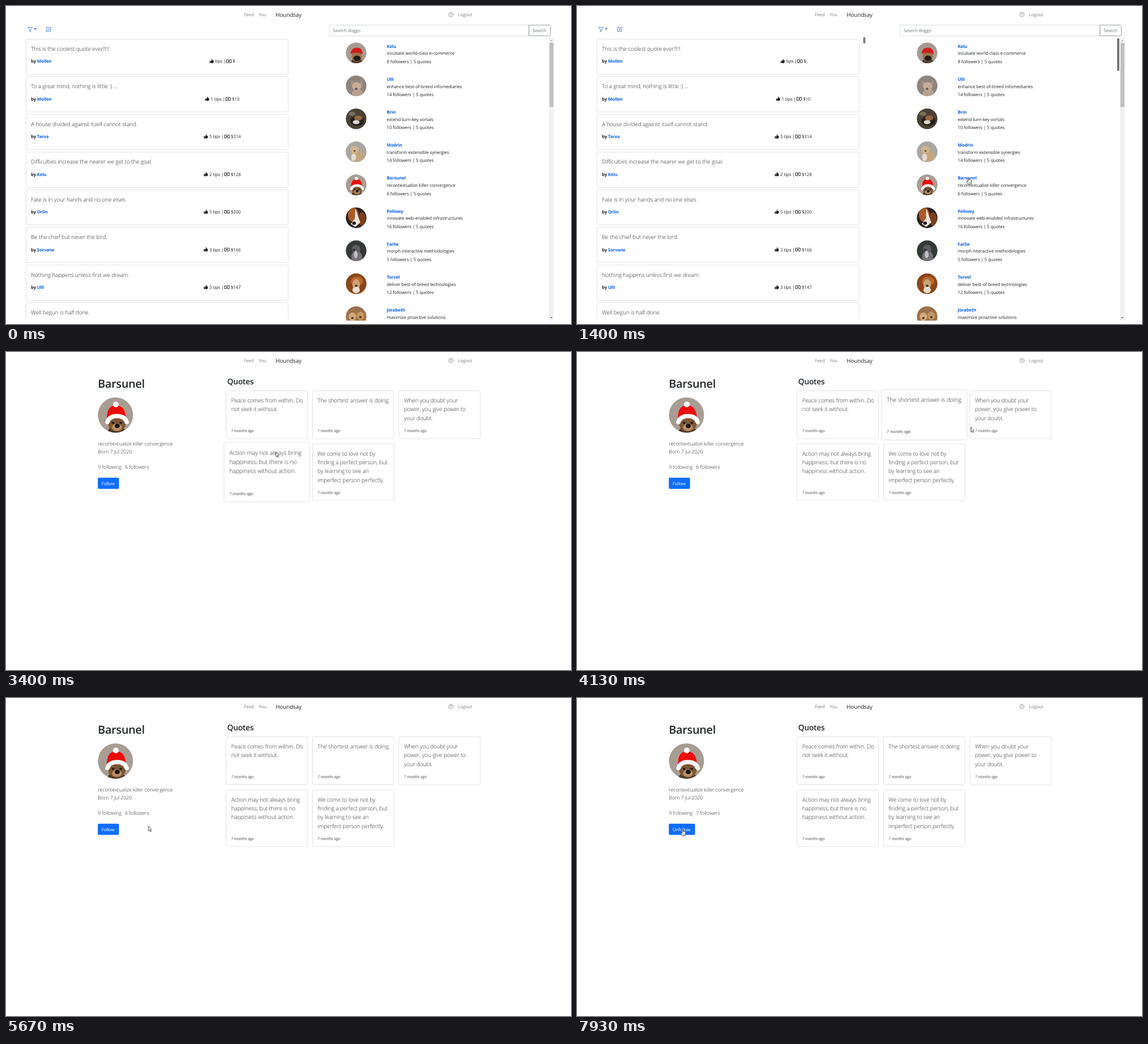
Write an HTML page that moves like this. It is 998 by 561 pixels and loops after 8 s.

```html
<!DOCTYPE html>
<html lang="en">
<head>
<meta charset="utf-8">
<title>Houndsay</title>
<style>
html, body { margin: 0; width: 100%; height: 100%; overflow: hidden; background: #fff; }
svg { display: block; width: 998px; height: 561px; }
text { font: 7.9px "Open Sans", "Noto Sans", sans-serif; letter-spacing: -.1px; fill: #212529; text-rendering: geometricPrecision; }
.nav, .gray { fill: #7d7d7d; }
.gray { fill: #6c757d; }
.brand { font-size: 9.9px; letter-spacing: -.12px; }
.bold { font-size: 7.8px; font-weight: 700; letter-spacing: -.15px; }
.link { fill: #0a60e6; }
.quote { font-size: 9.9px; font-weight: 300; letter-spacing: -.07px; }
.lead { font-size: 8.85px; font-weight: 300; letter-spacing: -.06px; }
.ago { font-size: 6.8px; font-style: italic; letter-spacing: -.08px; fill: #444; }
.h1 { font-size: 19.8px; font-weight: 600; letter-spacing: -.25px; }
.h2 { font-size: 13.8px; font-weight: 600; letter-spacing: -.25px; }
.white { fill: #fff; }
.url { font-size: 6.1px; letter-spacing: -.04px; fill: #444; }
.card { fill: #fff; stroke: #e0e0e0; stroke-width: .9; }
.zoom { transform-box: fill-box; transform-origin: center; }
</style>
</head>
<body>
<svg id="stage" viewBox="0 0 998 561"></svg>
<script>
const LOOP = 8000;
let css = '', count = 0;

// Registers a looping keyframe animation and returns its style attribute.
function animate(prop, stops, ease) {
  const id = 'k' + count++;
  const body = stops.map(([ms, v]) => `${ms * 100 / LOOP}%{${prop}:${v}}`).join('');
  css += `@keyframes ${id}{${body}}`;
  return `style="animation:${id} ${LOOP}ms ${ease} infinite"`;
}
const show = (...spans) => animate('opacity',
  [[0, 0], ...spans.flatMap(([a, b]) => [[a, 1], [b, 0]])], 'step-end');
const hover = (...spans) => animate('transform', [[0, 'scale(1)'],
  ...spans.flatMap(([a, b]) => [[a, 'scale(1)'], [a + 110, 'scale(1.05)'], [b, 'scale(1.05)'], [b + 110, 'scale(1)']]),
  [LOOP, 'scale(1)']], 'linear');

const text = (x, y, s, cls = '') => `<text x="${x}" y="${y}" class="${cls}">${s}</text>`;
const rect = (x, y, w, h, attrs) => `<rect x="${x}" y="${y}" width="${w}" height="${h}" ${attrs}/>`;
const oval = (x, y, rx, ry, fill) => `<ellipse cx="${x}" cy="${y}" rx="${rx}" ry="${ry}" fill="${fill}"/>`;
const path = (d, attrs) => `<path d="${d}" ${attrs}/>`;
const at = (x, y, s, scale = 1) => `<g transform="translate(${x} ${y}) scale(${scale})">${s}</g>`;
const line = (color, w) => `fill="none" stroke="${color}" stroke-width="${w}" stroke-linejoin="round" stroke-linecap="round"`;

// Portraits are drawn in a circle of radius 50.
const avatar = (x, y, r, art) => at(x, y, `<g clip-path="url(#round)">${art}</g>`, r / 50);
const santa = oval(0, 0, 50, 50, '#a89d93') + oval(3, 48, 25, 18, '#4d3927') + oval(4, 24, 25, 22, '#7d5835') +
  oval(4, 35, 14, 10, '#b98f62') + oval(5, 31, 7, 6, '#17120f') + oval(-7, 22, 4, 3, '#20160f') + oval(15, 22, 4, 3, '#20160f') +
  path('M-24 10C-25-16-15-27 2-27C20-27 28-14 30 10Z', 'fill="#f00a0a"') +
  path('M-23 20Q-17 3 4 3Q26 3 32 20', line('#fff', 12)) + oval(1, -30, 8, 8, '#fff');
const portraits = [
  oval(0, 0, 50, 50, '#a59b92') + oval(3, 44, 27, 20, '#54402f') + oval(3, 16, 25, 25, '#9a754f') +
    oval(4, 26, 17, 13, '#251b16') + path('M-27 4C-24-20-10-25 4-25C22-25 31-12 31 6Q4-8-27 4Z', 'fill="#d01d1b"'),
  oval(0, 0, 50, 50, '#8f857e') + oval(6, 42, 28, 28, '#b8a090') + path('M-28-30L-6-10L14-12L32-32L26 10L-18 12Z', 'fill="#ad9282"') +
    oval(2, 2, 22, 20, '#c5ab99') + oval(0, 14, 6, 5, '#5a4a44'),
  oval(0, 0, 50, 50, '#4a4334') + oval(6, 10, 34, 24, '#241f1b') + oval(10, -4, 20, 12, '#95673f') +
    oval(0, 16, 16, 10, '#ddd6cb') + oval(-20, -24, 16, 10, '#77705d'),
  oval(0, 0, 50, 50, '#a9a7a2') + oval(4, 20, 30, 26, '#c6a57b') + oval(-8, -10, 20, 18, '#d2b48c') +
    oval(-12, 26, 12, 18, '#e2dcd0') + oval(-8, -4, 5, 4, '#64513c'),
  santa,
  oval(0, 0, 50, 50, '#2b201b') + oval(-14, -14, 26, 34, '#a85a28') + oval(28, 6, 18, 32, '#7d3f1c') +
    path('M-4-46L8-10L20 22L-4 44L-26 30L-6 4Z', 'fill="#eee5dc"') + oval(-10, 26, 9, 8, '#1b1514'),
  oval(0, 0, 50, 50, '#343a35') + oval(2, 30, 26, 30, '#77717a') + oval(0, -8, 20, 20, '#615d64') +
    oval(-2, 18, 9, 18, '#c3c0c2') + oval(-10, -4, 7, 6, '#39363b'),
  oval(0, 0, 50, 50, '#8a461a') + oval(4, -12, 30, 22, '#b9682e') + oval(0, 4, 18, 26, '#caa27c') +
    oval(0, 30, 18, 16, '#e8dccb') + oval(0, 10, 6, 5, '#3a2114'),
  oval(0, 0, 50, 50, '#9e724d') + oval(-18, 0, 18, 20, '#d3ab7a') + oval(20, -4, 18, 20, '#c49560') +
    oval(-18, 6, 6, 5, '#4a3324') + oval(20, 2, 6, 5, '#4a3324')
];

const clips = '<defs><clipPath id="feed"><path d="M30 55H512V552H30Z"/></clipPath>' +
  '<clipPath id="dogs"><path d="M560 56H958V554.5H560Z"/></clipPath>' +
  '<clipPath id="round"><circle r="50"/></clipPath></defs>';

const nav = text(420.3, 18.2, 'Feed', 'nav') + text(446.3, 18.2, 'You', 'nav') + text(476.3, 19.3, 'Houndsay', 'brand') +
  text(798.5, 18.2, 'Logout', 'nav') + `<circle cx="785.8" cy="15" r="3.9" ${line('#777', .7)}/>` +
  path('M784.5 14.2C784.5 12.4 787.2 12.4 787.2 14C787.2 15 785.9 15 785.9 16M785.9 17V17.1', line('#666', .7));

const thumb = path('M0 3.8H1.7V8.2H0ZM2.2 4L4 2.2V.3Q4.2-.3 5 .2Q5.8 1 5.2 3H7.3Q8.3 3.4 7.8 4.5Q8 5 7.6 5.7Q7.7 6.4 7.1 6.9Q7.2 8.2 5.9 8.2H4Q2.8 8.2 2.2 7.5Z', 'fill="#161616"');
const cash = rect(.4, 1.5, 8, 5.2, line('#222', .8)) + oval(4.4, 4.1, 1.3, 1.4, '#222') +
  path('M.4 3Q1.8 3 1.8 1.5M7 1.5Q7 3 8.4 3M.4 5.2Q1.8 5.2 1.8 6.7M7 6.7Q7 5.2 8.4 5.2', line('#222', .5));

const feed = [
  ['This is the coolest quote ever!!!!!', 'Mollen', '', ''],
  ['To a great mind, nothing is little :) ...', 'Mollen', '1 ', 10],
  ['A house divided against itself cannot stand.', 'Tarva', '5 ', 314],
  ['Difficulties increase the nearer we get to the goal.', 'Kelu', '2 ', 128],
  ['Fate is in your hands and no one elses', 'Orlin', '5 ', 200],
  ['Be the chief but never the lord.', 'Sorvane', '3 ', 166],
  ['Nothing happens unless first we dream.', 'Ulli', '3 ', 147],
  ['Well begun is half done.', 'Brin', '4 ', 120]
].map(([quote, who, tips, money], i) => {
  const x = money === '' ? 359.8 : money < 100 ? 351.8 : 349.5;
  const c = x + (money === '' ? 29.6 : 36.4);
  return at(0, i * 66.45, rect(35.5, 58.4, 463, 62, 'rx="2" class="card"') + text(44, 79, quote, 'quote') +
    text(44, 100.3, `by <tspan class="link">${who}</tspan>`, 'bold') + at(x, 93.4, thumb, .9) +
    text(x + 9.6, 100.3, tips + 'tips |') + at(c, 93.3, cash) + text(c + 11, 100.3, '$' + money));
}).join('');

const dogs = [
  ['Kelu', 'incubate world-class e-commerce', 8],
  ['Ulli', 'enhance best-of-breed infomediaries', 14],
  ['Brin', 'extend turn-key vortals', 10],
  ['Modrin', 'transform extensible synergies', 14],
  ['Barsunel', 'recontextualize killer convergence', 6],
  ['Pellowy', 'innovate web-enabled infrastructures', 16],
  ['Farlie', 'morph interactive methodologies', 5],
  ['Torvel', 'deliver best-of-breed technologies', 12],
  ['Jorabeth', 'maximize proactive solutions', 9]
].map(([name, job, fans], i) => at(0, i * 58.17,
  avatar(618.5, 82.7, 18.4, portraits[i]) + text(672.5, 73.8, name, 'bold link') +
  text(672.5, 86.4, job) + text(672.5, 100.9, `${fans} followers | 5 quotes`))).join('');

const blue = '#2468c8';
const tools = path('M38.9 37.6H46.1V38.8L43.5 41.7V44.2L41.5 45V41.7L38.9 38.8Z', line(blue, .8)) +
  path('M49 39.3H54L51.5 42Z', `fill="${blue}"`) +
  path('M76 37.6H71.8V45H79V41.2M74.3 42.5L74.7 40.9L78.6 37L79.8 38.2L75.9 42.1Z', line(blue, .8)) +
  rect(571, 33.7, 353, 19, `rx="2" ${line('#ced4da', .8)}`) + text(577.3, 46.3, 'Search doggo', 'gray') +
  path('M924 33.7H959.7Q961.5 33.7 961.5 35.5V50.9Q961.5 52.7 959.7 52.7H924Z', line('#7b838a', .8)) + text(930.3, 46.3, 'Search', 'gray');

const scrollbar = rect(959, 56, 8.7, 498.7, 'fill="#f1f1f1"') + rect(960, 65, 7, 113, 'fill="#c1c1c1"') +
  path('M961.5 62L963.4 60L965.3 62Z', 'fill="#a3a3a3"') + path('M961.5 549L963.4 551L965.3 549Z', 'fill="#505050"');

const home = `<g ${show([0, 1900])}>` + tools + `<g clip-path="url(#feed)">${feed}</g><g clip-path="url(#dogs)">${dogs}</g>` + scrollbar +
  rect(505.5, 55, 4, 11.2, `rx="1.6" fill="#808080" ${show([140, 1540])}`) +
  rect(954, 57, 4, 57.3, `rx="1.6" fill="#777" ${show([600, 1900])}`) + '</g>';

const quotes = [
  [388.8, 68.4, 84.5, ['Peace comes from within. Do', 'not seek it without.'], [[3450, 3750]]],
  [541.4, 68.4, 84.5, ['The shortest answer is doing.'], [[3790, 4135]]],
  [694, 68.4, 84.5, ['When you doubt your', 'power, you give power to', 'your doubt.'], [[4140, 4670]]],
  [388.8, 162, 100, ['Action may not always bring', 'happiness; but there is no', 'happiness without action.'], [[3190, 3430], [5010, 5360]]],
  [541.4, 162, 100, ['We come to love not by', 'finding a perfect person, but', 'by learning to see an', 'imperfect person perfectly.'], [[2850, 3160], [4760, 5005]]]
].map(([x, y, h, lines, spans]) => `<g class="zoom" ${hover(...spans)}>` + rect(x, y, 143.8, h, 'rx="2" class="card"') +
  lines.map((s, i) => text(x + 8.9, y + 20.6 + i * 15.6, s, 'quote')).join('') +
  text(x + 8.9, y + h - 11.6, '7 months ago', 'ago') + '</g>').join('');

const button = (w, label) => rect(162.2, 221.8, w, 19.6, 'rx="2" fill="#0d6efd"') + text(168.7, 234.6, label, 'white');
const CLICK = 7230;
const profile = `<g ${show([1900, LOOP])}>` + text(162.3, 63.2, 'Barsunel', 'h1') + avatar(193.4, 111.2, 31.2, santa) +
  text(162.3, 165.2, 'recontextualize killer convergence', 'lead') + text(162.3, 179.1, 'Born 7 Jul 2020', 'lead') +
  text(162.3, 205.7, '9 following', 'lead') + text(390.8, 57, 'Quotes', 'h2') + quotes +
  `<g ${show([0, CLICK])}>` + text(210.2, 205.7, '6 followers', 'lead') + button(37.4, 'Follow') + '</g>' +
  `<g ${show([CLICK, LOOP])}>` + text(210.2, 205.7, '7 followers', 'lead') + button(46.3, 'Unfollow') + '</g></g>';

const status = `<g ${show([1530, 2950])}>` + path('M0 549.5H89.5Q91.3 549.5 91.3 551.3V561H0Z', 'fill="#dee1e6" stroke="#c9ccd1" stroke-width=".6"') +
  text(2.3, 557.8, 'localhost:3004/dogs/profile/11', 'url') + '</g>';

const route = [
  [0, 27, 330], [70, 27, 330], [350, 230, 350], [650, 520, 330], [900, 688, 306], [1050, 691, 302.5], [2710, 691, 302.5],
  [2960, 640, 225], [3180, 545, 212], [3330, 485, 200], [3520, 462, 135], [3660, 480, 108], [3800, 545, 108],
  [3960, 622, 118], [4130, 695.3, 132], [4350, 765, 124], [4560, 755, 130], [4700, 700, 152], [4830, 635, 190],
  [5000, 522, 198.5], [5200, 450, 208], [5400, 375, 217], [5670, 251.5, 225.5], [6050, 233, 228], [6250, 222, 245],
  [6420, 195, 266], [6600, 142, 240], [6780, 158, 182], [6980, 182, 226], [7150, 185.5, 230], [LOOP, 186.3, 231.5]
].map(([ms, x, y]) => [ms, `translate(${x}px,${y}px)`]);
const outline = 'fill="#fff" stroke="#222" stroke-width=".8" stroke-linejoin="round"';
const arrow = path('M.2.3V9.1L2.1 7.4L3.5 10.3L4.8 9.7L3.5 6.9H5.6Z', outline);
const hand = path('M-.8.9Q.3-.3 1.1.9V4.6L1.4 3.7Q2.4 3.2 2.8 4.2Q3.8 3.5 4.3 4.6Q5.4 4.2 5.7 5.4V8.4Q5.5 10 4.6 12H-.2Q-1.2 9.8-3.1 7.6Q-3 6.2-1.6 6.7L-.8 7.6Z', outline) +
  path('M1.2 8V10.2M2.6 8V10.2M4 8V10.2', line('#555', .5));
const cursor = `<g ${animate('transform', route, 'linear')}><g ${show([70, 900], [2720, 6960])}>${arrow}</g>` +
  `<g ${show([900, 2720], [6960, LOOP])}>${hand}</g></g>`;

const style = document.createElement('style');
style.textContent = css;
document.head.append(style);
document.getElementById('stage').innerHTML = clips + home + profile + nav + status + cursor;
</script>
</body>
</html>
```
